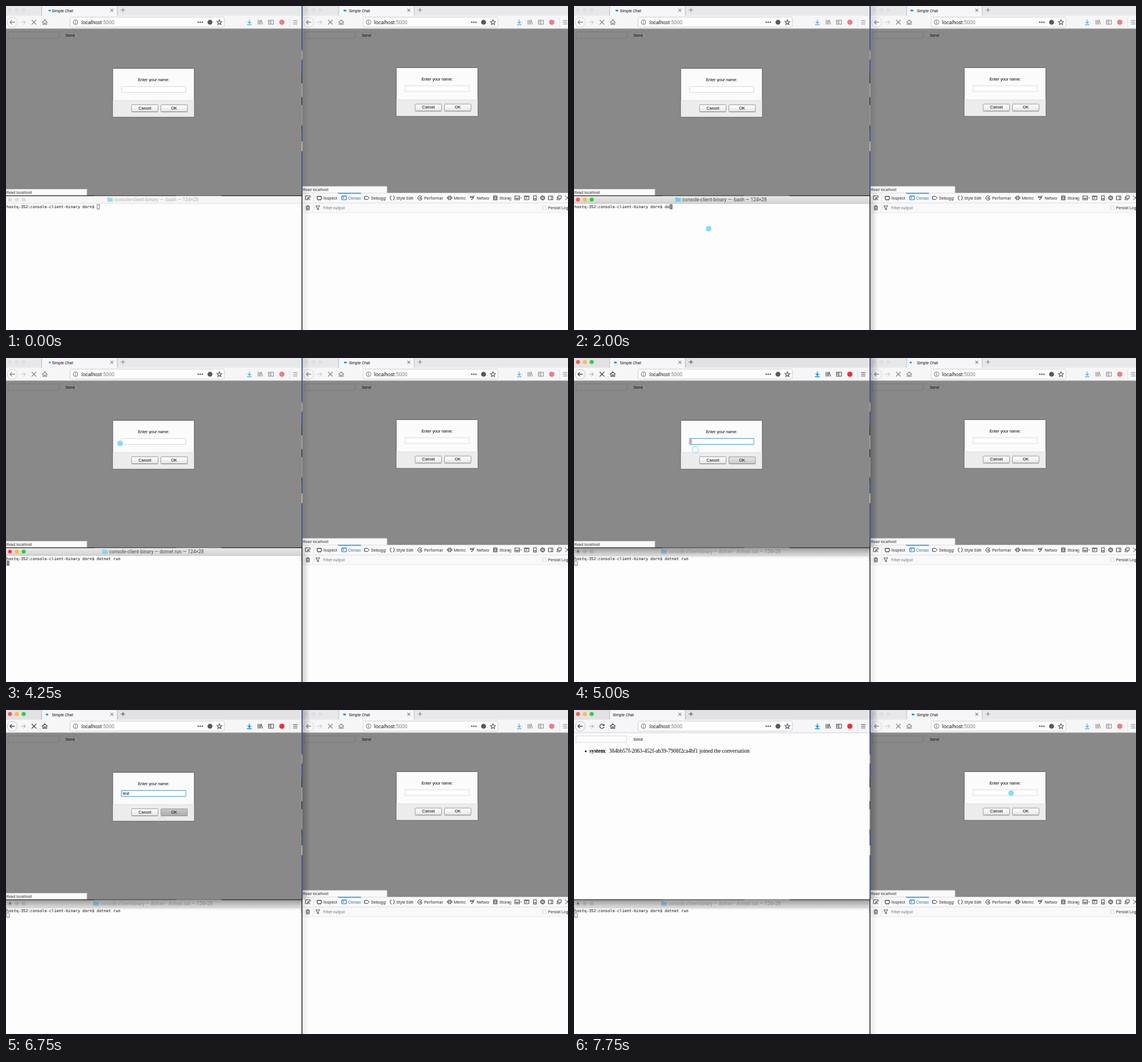
Write an HTML page with a canvas that moves like this. It is 985 px wide and 569 px high and loops after 8 s.

```html
<!DOCTYPE html>
<html lang="en">
<head>
<meta charset="utf-8">
<title>Simple Chat</title>
<style>
html, body { margin: 0; width: 100%; height: 100%; overflow: hidden; background: #fdfdfd; }
canvas { display: block; }
</style>
</head>
<body>
<canvas id="stage" width="985" height="569"></canvas>
<script>
const ctx = document.getElementById('stage').getContext('2d');
const LOOP = 8000, STEP = 250;
const UI = 'Roboto, sans-serif', SANS = '"Liberation Sans", sans-serif';
const SERIF = '"Liberation Serif", serif', MONO = '"DejaVu Sans Mono", monospace';
const INK = '#46464b', BLUE = '#0a84ff';
const LIGHTS = ['#fc5b57', '#fdbc40', '#34c84a'];
const PROMPT = 'hostq-352:console-client-binary dorn$ ';
const CELL = 4.165;

// Pointer keys: time, x, y
const POINTER = [[250, 252, 562], [750, 234, 403], [1250, 234, 403], [1500, 236, 391], [3750, 236, 391],
  [4250, 200, 150], [4500, 203, 153], [4750, 213, 161], [5000, 213, 161], [5250, 214, 168],
  [6250, 214, 168], [6500, 262, 188], [6750, 273, 194], [7000, 300, 190], [7500, 776, 166], [7750, 766, 146]];
// Click rings: start, end, opacity
const RINGS = [[1000, 1250, .35], [5000, 5000, .6], [6750, 6750, .3]];

function rect(x, y, w, h, fill, stroke, r = 0) {
  ctx.beginPath();
  ctx.roundRect(x, y, w, h, r);
  if (fill) { ctx.fillStyle = fill; ctx.fill(); }
  if (stroke) { ctx.lineWidth = 1; ctx.strokeStyle = stroke; ctx.stroke(); }
}
function disc(x, y, r, fill, stroke, width = 1) {
  ctx.beginPath();
  ctx.arc(x, y, r, 0, 7);
  if (fill) { ctx.fillStyle = fill; ctx.fill(); }
  if (stroke) { ctx.lineWidth = width; ctx.strokeStyle = stroke; ctx.stroke(); }
}
function text(s, x, y, size, color = '#222', font = UI, weight = '') {
  ctx.font = `${weight} ${size}px ${font}`;
  ctx.fillStyle = color;
  ctx.fillText(s, x, y);
  return ctx.measureText(s).width;
}
function icon(x, y, d, color = INK, width = 1.1, filled = false) {
  ctx.save();
  ctx.translate(x, y);
  ctx.lineWidth = width;
  ctx.strokeStyle = ctx.fillStyle = color;
  const path = new Path2D(d);
  if (filled) ctx.fill(path); else ctx.stroke(path);
  ctx.restore();
}
function fade(x, y, w, h, dx, dy, color, end) {
  const g = ctx.createLinearGradient(x, y, x + dx, y + dy);
  g.addColorStop(0, color);
  g.addColorStop(1, end);
  ctx.fillStyle = g;
  ctx.fillRect(x, y, w, h);
}
const shadow = (x, y, w, h, dx, dy, a) => fade(x, y, w, h, dx, dy, `rgba(0,0,0,${a})`, 'rgba(0,0,0,0)');

const CROSS = 'M-4-4L4 4M4-4L-4 4', SMALL_CROSS = 'M-2.6-2.6L2.6 2.6M2.6-2.6L-2.6 2.6';
const BOX = 'M-4-3.2H4V3.2H-4Z';
const MENU = 'M-3.7-3H3.7M-3.7 0H3.7M-3.7 3H3.7';
const STAR = 'M0-4.4L1.3-1.5L4.5-1.2L2.1.9L2.8 4L0 2.4L-2.8 4L-2.1.9L-4.5-1.2L-1.3-1.5Z';
const DOWN = 'M0-4.5V1.8M-3-1L0 2L3-1M-4 4.3H4';
const BOOKS = 'M-3.7-4V4M-1.3-4V4M.8-4V4M2-3.8L4.2 4';

function trafficLights(x, y, focused, offColor, busy) {
  for (let i = 0; i < 3; i++) disc(x + 12 * i, y, 3.6, focused ? LIGHTS[i] : offColor);
  if (busy) disc(x, y, 1.2, focused ? '#7d0d0b' : '#555');
}

function throbber(t, center, offset) {
  const a = 2 * Math.PI * (t / 1050 - offset);
  const w = 2.6 + 2.6 * Math.abs(Math.sin(a));
  rect(center + 3.1 * Math.cos(a) - w / 2, 6.6, w, 2.6, BLUE, null, 1.3);
}

function browser(b, t) {
  const { x, w, focused, loading } = b;
  const dim = focused ? 1 : .62;
  ctx.save();
  ctx.beginPath();
  ctx.rect(x, 0, w, b.bottom);
  ctx.clip();

  rect(x, 0, w, 17, focused ? '#e2e2e5' : '#e7e8ea');
  rect(x + b.tab, 0, 133, 18, '#f6f6f8');
  rect(x + b.tab, 0, 1, 17, '#b9b9bd');
  rect(x + b.tab + 132.5, 0, 1, 17, '#b9b9bd');
  trafficLights(x + 7, 7, focused, '#dedee0');
  const tabX = x + b.tab;
  if (loading) throbber(t, b.spin, b.phase);
  text('Simple Chat', loading ? tabX + 18.5 : tabX + 6, 10.8, 6.9, '#111');
  icon(tabX + 123.5, 7.5, SMALL_CROSS, '#444', 1);
  ctx.globalAlpha = dim;
  icon(tabX + 143, 7, 'M-4 0H4M0-4V4', INK, 1);

  ctx.globalAlpha = 1;
  rect(x, 17, w, 23, '#f6f6f8');
  ctx.globalAlpha = dim;
  disc(x + 11, 28.5, 8.6, '#fcfcfc', '#b5b5b8', .9);
  icon(x + 11, 28.5, 'M4.3 0H-4M-.5-3.7L-4.2 0L-.5 3.7', INK, 1.3);
  icon(x + 30, 28.5, 'M-4.3 0H4M.5-3.7L4.2 0L.5 3.7', '#b3b3b5', 1.1);
  if (loading) icon(x + 49, 28.5, CROSS, INK, 1.3);
  else {
    icon(x + 49, 28.5, 'M3.2-1.8A3.7 3.7 0 1 0 3.6 1', INK, 1.3);
    icon(x + 49, 28.5, 'M4.4-4.4V-.4H.4Z', INK, 1, true);
  }
  icon(x + 68, 28.5, 'M-4.5.2L0-4.2L4.5.2M-3.2-.5V4H-1V1H1V4H3.2V-.5', INK, 1.2);

  ctx.globalAlpha = 1;
  rect(b.urlL, 19.5, b.urlR - b.urlL, 17.5, '#fff', '#cfcfd2', 2);
  const ux = b.urlL + 9.5, ur = b.urlR;
  disc(ux, 28.5, 4, null, '#55555a', .9);
  rect(ux - .5, 28, 1, 2.8, '#55555a');
  rect(ux - .5, 26, 1, 1.1, '#55555a');
  const hostW = text('localhost', ux + 10, 31.8, 8.8, '#161618');
  text(':5000', ux + 10 + hostW, 31.8, 8.8, '#77777a');
  for (let i = -1; i < 2; i++) disc(ur - 42 + i * 3.6, 28.5, 1.2, INK);
  disc(ur - 25, 28.5, 4.3, '#58585c');
  icon(ur - 8.5, 28.5, STAR, INK, 1.1);

  ctx.globalAlpha = dim;
  const tx = b.tools;
  icon(tx, 28.5, DOWN, BLUE, 1.4);
  icon(tx + 19, 28.5, BOOKS, INK, 1.1);
  icon(tx + 38, 28.5, 'M-4.3-3.5H4.3V3.5H-4.3ZM-.3-3.5V3.5M-3-1.5H-1.5M-3 .5H-1.5', INK, 1.1);
  disc(tx + 57, 28.5, 4.6, '#ee2f38');
  rect(b.menu - 10.5, 20, 1, 17, '#d2d2d5');
  icon(b.menu, 28.5, MENU, INK, 1.1);
  ctx.globalAlpha = 1;

  rect(x, 40, w, b.bottom - 40, loading ? '#898989' : '#fdfdfd');
  rect(x, 39.6, w, 1, loading ? '#a0a0a0' : '#d0d0d2');
  rect(x + 3.5, 45.5, 89, 11.5, null, loading ? '#7b7b7b' : '#d4d4d4');
  rect(x + 96.5, 46.5, 31, 9.5, loading ? '#8b8b8b' : '#fff', loading ? '#828282' : '#eee', 1.5);
  text('Send', x + 104, 53.8, 7, '#080808', SANS);
  if (loading) {
    rect(x, b.bottom - 11.5, b.statusW, 12, '#fafafa', '#b0b0b0');
    text('Read localhost', x + 1, b.bottom - 3, 6.8, '#333');
    dialog(b.dialog, t);
  } else {
    disc(20.5, 72.5, 1.5, '#000');
    let cx = 27;
    cx += text('system', cx, 75.2, 9.45, '#000', SERIF, 'bold');
    cx += text(':\u00a0 ', cx, 75.2, 9.45, '#000', SERIF);
    text('384bb57f-2063-452f-ab39-7908f2ca4bf1 joined the conversation', cx, 75.2, 9.45, '#000', SERIF);
  }
  ctx.restore();
}

function button(label, x, y, labelX, top, bottom) {
  fade(x, y, 46.5, 12, 0, 12, top, bottom);
  rect(x, y, 46.5, 12, null, '#9c9c9c', 1);
  rect(x, y + 12.2, 46.5, 1, 'rgba(0,0,0,.22)');
  text(label, labelX, y + 8.2, 7.2, '#000', SANS);
}

function dialog({ x, y, active, value = '', caret, pressed }) {
  rect(x - .5, y - .5, 143, 85.5, '#fbfbfb', '#555', 1);
  rect(x, y + 56, 142, 28.5, '#ececec');
  rect(x, y + 55.5, 142, .8, '#dcdcdc');
  text('Enter your name:', x + 43.7, y + 22, 7.2, '#000', SANS);
  rect(x + 15, y + 31.5, 112.5, 10, '#fff', active ? '#6ea9e6' : '#d9d9d9');
  if (active) rect(x + 14.3, y + 30.8, 114, 11.4, null, 'rgba(90,160,235,.45)', 1);
  text(value, x + 17, y + 38.7, 7.2, '#000', SANS);
  if (caret) rect(x + 17, y + 32.5, .9, 8, '#000');
  button('Cancel', x + 32.5, y + 63.5, x + 44.8, '#fff', '#e6e6e6');
  const [top, low] = pressed ? ['#c6c6c6', '#aeaeae'] : active ? ['#e6e6e6', '#cacaca'] : ['#fff', '#e6e6e6'];
  button('OK', x + 84, y + 63.5, x + 102, top, low);
}

function terminal(t) {
  const focused = t >= 1250 && t < 4750, running = t >= 3600;
  rect(0, 333, 518, 236, '#fdfdfd');
  if (focused) fade(0, 334, 518, 13, 0, 13, '#e8e8e8', '#d3d3d3');
  else rect(0, 334, 518, 13, '#f6f6f6');
  rect(0, 346.4, 518, .8, focused ? '#b8b8b8' : '#d8d8d8');
  trafficLights(7, 340, focused, '#dcdcdc', running);

  const job = !running ? '-bash' : focused ? 'dotnet run' : 'dotnet • dotnet run';
  const title = `console-client-binary — ${job} — 124×28`;
  ctx.font = `8.45px ${UI}`;
  const left = 257.7 - (ctx.measureText(title).width + 12) / 2;
  ctx.globalAlpha = focused && !running ? 1 : .65;
  icon(left, 340, 'M0-3.7H3.5L4.5-2.8H9.5V3.7H0Z', '#6fc8ef', 1, true);
  ctx.globalAlpha = 1;
  text(title, left + 12, 343, 8.45, focused ? '#484848' : '#b2b2b2');

  const command = 'dotnet run'.slice(0, Math.max(0, Math.floor((t - 1600) / 170)));
  text(PROMPT + command, 1, 354.6, CELL / .602, '#000', MONO);
  const cx = running ? 1.5 : 1.5 + CELL * (PROMPT.length + command.length);
  const cy = running ? 356.5 : 348.5;
  rect(cx, cy, 4, 8, focused ? '#8a8a8a' : null, '#777');
  if (running) {
    icon(.5, 352, 'M1.5-3.5H0V3.5H1.5', '#999', .8);
    icon(517, 352, 'M-1.5-3.5H0V3.5H-1.5', '#aaa', .8);
  }
}

const PANELS = [
  ['Inspector', 549, 556.5, 581, 'M-3.5-2.5H3.5V3H-3.5ZM-1.5-4V-2.5M1.5-4V-2.5M-1.5 3V4.5M1.5 3V4.5'],
  ['Console', 592.5, 600, 621.5, BOX + 'M-2-1.2L-.3 0L-2 1.2M-4-3.2H4'],
  ['Debugger', 632.5, 640, 665.5, 'M-4-2.8H1.2L4 0L1.2 2.8H-4Z'],
  ['Style Editor', 677, 684, 714, 'M-1.5-4Q-3-4-3-2Q-3 0-4 0Q-3 0-3 2Q-3 4-1.5 4M1.5-4Q3-4 3-2Q3 0 4 0Q3 0 3 2Q3 4 1.5 4'],
  ['Performance', 725.5, 733, 766, 'M2.7-2.7A3.8 3.8 0 1 0 3.8 1H0L3-2.5M-1.5 0H0'],
  ['Memory', 777.5, 785, 805.5, 'M-2-3H2V3H-2ZM-4-2V2M4-2V2M0-1V1'],
  ['Network', 817, 825, 846.5, 'M-4-2.5H0L3 0L0 2.5H-2M-4-.5H2M1-3H4'],
  ['Storage', 857.5, 865, 885.5, 'M-3-3.5H3V3.5H-3ZM-3-1.2H3M-3 1.2H3']
];

function devtools() {
  rect(519, 328, 466, 241, '#fdfdfd');
  rect(519, 328, 466, 35, '#f9f9fa');
  rect(519, 328, 466, .8, '#d0d0d3');
  rect(519, 345.6, 466, .8, '#dedee0');
  rect(519, 362.4, 466, .8, '#dedee0');
  rect(582, 328, 40, 1.6, BLUE);
  icon(529, 337, 'M1 3H-4V-3.5H4V0M0-.5L4 4M0-.5V3M0-.5H3');
  rect(539, 331, .8, 12, '#dcdcdf');
  for (const [label, ix, x, end, d] of PANELS) {
    const color = label === 'Console' ? '#0a6fe0' : '#303034';
    icon(ix, 337, d, color, 1);
    ctx.save();
    ctx.beginPath();
    ctx.rect(x - 1, 329, end - x + 1, 16);
    ctx.clip();
    text(label, x, 339.7, 7.3, color);
    ctx.restore();
  }
  icon(896, 337, BOX + 'M-4 .5H4M0 .5V3');
  icon(903, 337, 'M-1.3-.5L0 .8L1.3-.5', INK, .8);
  icon(912.5, 337, BOX + 'M-2-1.5L0 0L-2 1.5M-4-2.6H4', INK, 1);
  icon(927, 337, 'M-2.3-4H2.3V4H-2.3ZM-2.3 1.5H2.3');
  disc(940.5, 337, 3.1, null, INK, 1.2);
  disc(940.5, 337, 1.1, null, INK, .8);
  icon(940.5, 337, 'M0-4.6V-3M0 3V4.6M-4.6 0H-3M3 0H4.6M-3.2-3.2L-2-2M3.2-3.2L2-2M-3.2 3.2L-2 2M3.2 3.2L2 2');
  icon(954.5, 337, BOX + 'M1.5-3.2V3.2', INK, 1);
  icon(969.5, 337, 'M-2-3.5H3.7V1H-2ZM-2-1H-3.7V3.2H1.5V1', INK, 1);
  icon(984, 337, CROSS, INK, 1);
  icon(529, 354.5, 'M-3.5-2.5H3.5M-1.2-2.5V-4H1.2V-2.5M-2.7-2.5V3.7H2.7V-2.5M-1-1V2.5M1-1V2.5', INK, 1);
  rect(538.5, 348, .8, 13, '#dcdcdf');
  icon(546.5, 354.5, 'M-3.5-3.5H3.5L1-.2V3.5L-1 2.5V-.2Z', INK, 1);
  text('Filter output', 556, 357, 7.08, '#77777b');
  rect(941, 351.3, 6, 6, '#fff', '#d0d0d3', 1);
  text('Persist Logs', 950, 357, 7.1, '#333');
}

function desktopGap() {
  rect(518, 0, 1.4, 569, '#141414');
  const bands = [[0, 78, '#2a45b8'], [78, 94, '#aaa'], [94, 118, '#2a45b8'], [136, 160, '#aaa'],
    [174, 210, '#999'], [217, 238, '#2a45b8'], [238, 255, '#c5c5c5'], [255, 330, '#2a45b8']];
  for (const [top, end, color] of bands) rect(518, top, 1.4, end - top, color);
  rect(0, 332.6, 518, 1.3, '#3c3c3c');
  rect(155, 332.8, 143, 1, '#777');
  rect(298, 332.8, 80, 1, '#b9a88c');
}

function pointer(t) {
  if (t < POINTER[0][0]) return;
  const i = POINTER.findIndex(k => k[0] >= t);
  const b = POINTER[i], a = POINTER[Math.max(0, i - 1)];
  const u = b === a ? 0 : (t - a[0]) / (b[0] - a[0]);
  const x = a[1] + (b[1] - a[1]) * u, y = a[2] + (b[2] - a[2]) * u;
  const ring = RINGS.find(r => t >= r[0] && t <= r[1]);
  if (ring) disc(x, y, 5.8, null, `rgba(104,205,245,${ring[2]})`, 1.2);
  else disc(x, y, 4.8, '#80dcfc');
}

function draw(t) {
  const active = t >= 4750, joined = t >= 7000;
  ctx.clearRect(0, 0, 985, 569);
  terminal(t);
  browser({
    x: 0, w: 518, bottom: 333, focused: active, loading: !joined, tab: 62, spin: 73.7, phase: .08,
    urlL: 112.5, urlR: 382.5, tools: 426.5, menu: 507, statusW: 142,
    dialog: {
      x: 187.5, y: 110, active, pressed: t >= 6750, caret: t === 4750 || t === 5000,
      value: 'test'.slice(0, Math.max(0, Math.floor((t - 5300) / 200)))
    }
  }, t);
  browser({
    x: 519.5, w: 466, bottom: 328, focused: false, loading: true, tab: 63, spin: 593, phase: .2,
    urlL: 626, urlR: 862, tools: 899.5, menu: 980, statusW: 148.5, dialog: { x: 684.5, y: 108.7 }
  }, t);
  devtools();
  desktopGap();
  if (active) shadow(0, 334, 518, 18, 0, 18, .36);
  shadow(519.4, 0, 14, 333, 14, 0, active ? .25 : .1);
  shadow(519.4, 333, 12, 236, 12, 0, t >= 1250 && !active ? .18 : .08);
  pointer(t);
}

function frame(now) {
  draw(Math.floor(now % LOOP / STEP) * STEP);
  requestAnimationFrame(frame);
}
requestAnimationFrame(frame);
</script>
</body>
</html>
```
